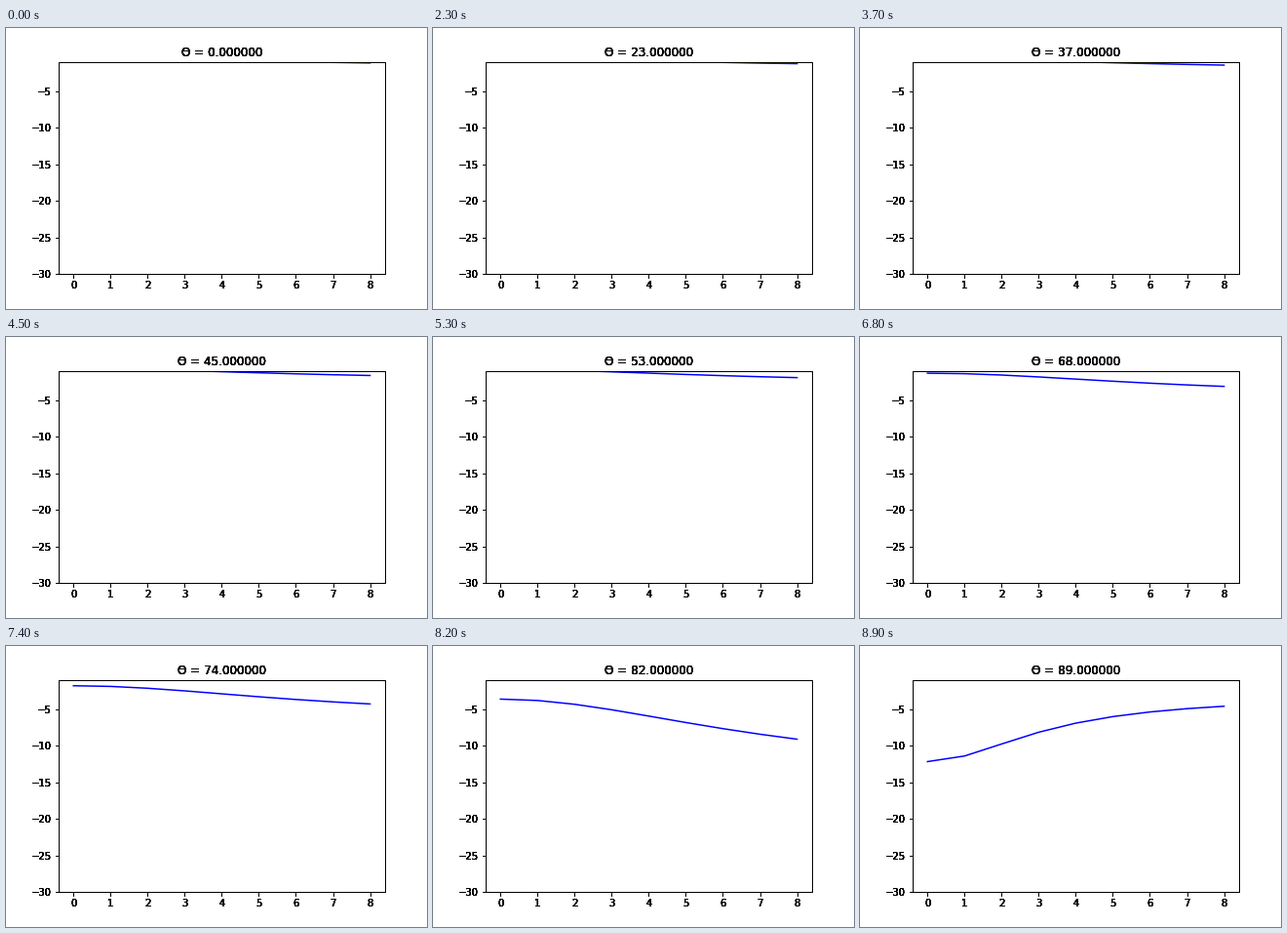
A matplotlib script for the animation above (9 s loop, 432 by 288 pixels).

```python
import numpy as np
import matplotlib.pyplot as plt
from matplotlib.animation import FuncAnimation

FRAMES = 90
INTERVAL = 100

x = np.arange(9)
index = 10.7 + 24 / (1 + 0.0735 * x**2)  # refractive index at each x


def reflection_db(degrees):
    """Reflection level in dB for p-polarised incidence."""
    z = 1 / (index * np.cos(np.radians(degrees)))
    gamma = np.abs((1 - z) / (1 + z))
    return 20 * np.log10(np.maximum(gamma, 1e-6))


def harden(artist, passes=8):
    """Draw repeatedly so that soft edges turn solid black."""
    draw = artist.draw

    def draw_solid(renderer):
        for _ in range(passes):
            draw(renderer)

    artist.draw = draw_solid


plt.rcParams["font.family"] = "DejaVu Sans"
fig = plt.figure(figsize=(6, 4), dpi=72, facecolor="white")
ax = fig.add_axes([0.125, 0.125, 0.775, 0.755])
ax.set_xlim(-0.4, 8.4)
ax.set_ylim(-30, -1)
ax.set_xticks(range(9))
ax.set_yticks(range(-30, 0, 5))
line, = ax.plot(x, reflection_db(0), color="blue", lw=1.5)
title = ax.set_title("", fontsize=12)

for artist in (title, ax.xaxis, ax.yaxis, *ax.spines.values()):
    harden(artist)


def update(theta):
    line.set_ydata(reflection_db(theta))
    title.set_text(f"Θ = {theta:f}")
    return line, title


anim = FuncAnimation(fig, update, frames=FRAMES, interval=INTERVAL,
                     repeat=True, repeat_delay=0, blit=False)
plt.show()
```
